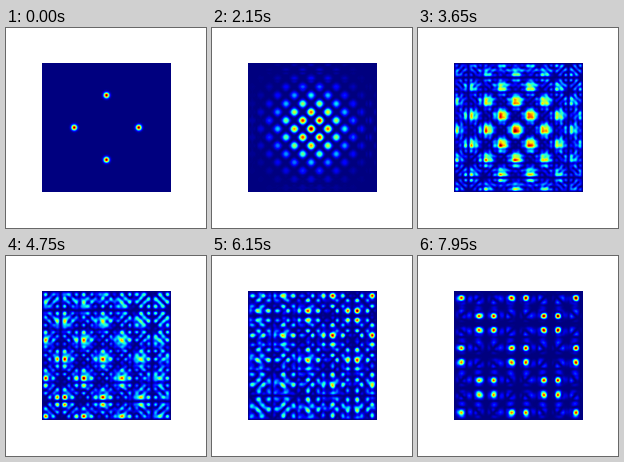
Write a matplotlib script that moves like this. It is 200 px wide and 200 px high and loops after 8 s.

```python
import numpy as np
import matplotlib.pyplot as plt
from matplotlib.animation import FuncAnimation

# Four wave packets flying to the middle of a square box with hard walls.
SIZE = 200
LEFT, BOTTOM, SIDE = 36, 36, 129
MODES = np.arange(1, 101)
WIDTH = 0.0205      # packet width, in box sides
PUSH = 45           # inward wave number
STEPS_PER_REVIVAL = 5120


def modes_at(x):
    return np.sin(np.pi * np.outer(x, MODES))


def packet(x, center, push=0):
    return np.exp(-(x - center) ** 2 / (2 * WIDTH ** 2) + 1j * push * x)


fine = np.linspace(0, 1, 2001)
project = modes_at(fine).T
pixels = modes_at((np.arange(SIDE) + 0.5) / SIDE)
mid = project @ packet(fine, 0.5)
pair = project @ (packet(fine, 0.25, PUSH) + packet(fine, 0.75, -PUSH))


def density(step):
    phase = np.exp(-2j * np.pi * MODES ** 2 * step / STEPS_PER_REVIVAL)
    a = pixels @ (mid * phase)
    b = pixels @ (pair * phase)
    rho = np.abs(np.outer(a, b) + np.outer(b, a)) ** 2
    return rho / rho.max()


fig = plt.figure(figsize=(2, 2), dpi=100, facecolor="white")
ax = fig.add_axes([LEFT / SIZE, BOTTOM / SIZE, SIDE / SIZE, SIDE / SIZE])
ax.axis("off")
image = ax.imshow(density(0), cmap="jet", vmin=0, vmax=1, origin="lower",
                  interpolation="nearest", aspect="auto")


def update(i):
    image.set_data(density(max(0, (i - 1) // 2)))
    return [image]


anim = FuncAnimation(fig, update, frames=160, interval=50,
                     repeat=True, repeat_delay=0)
plt.show()
```
